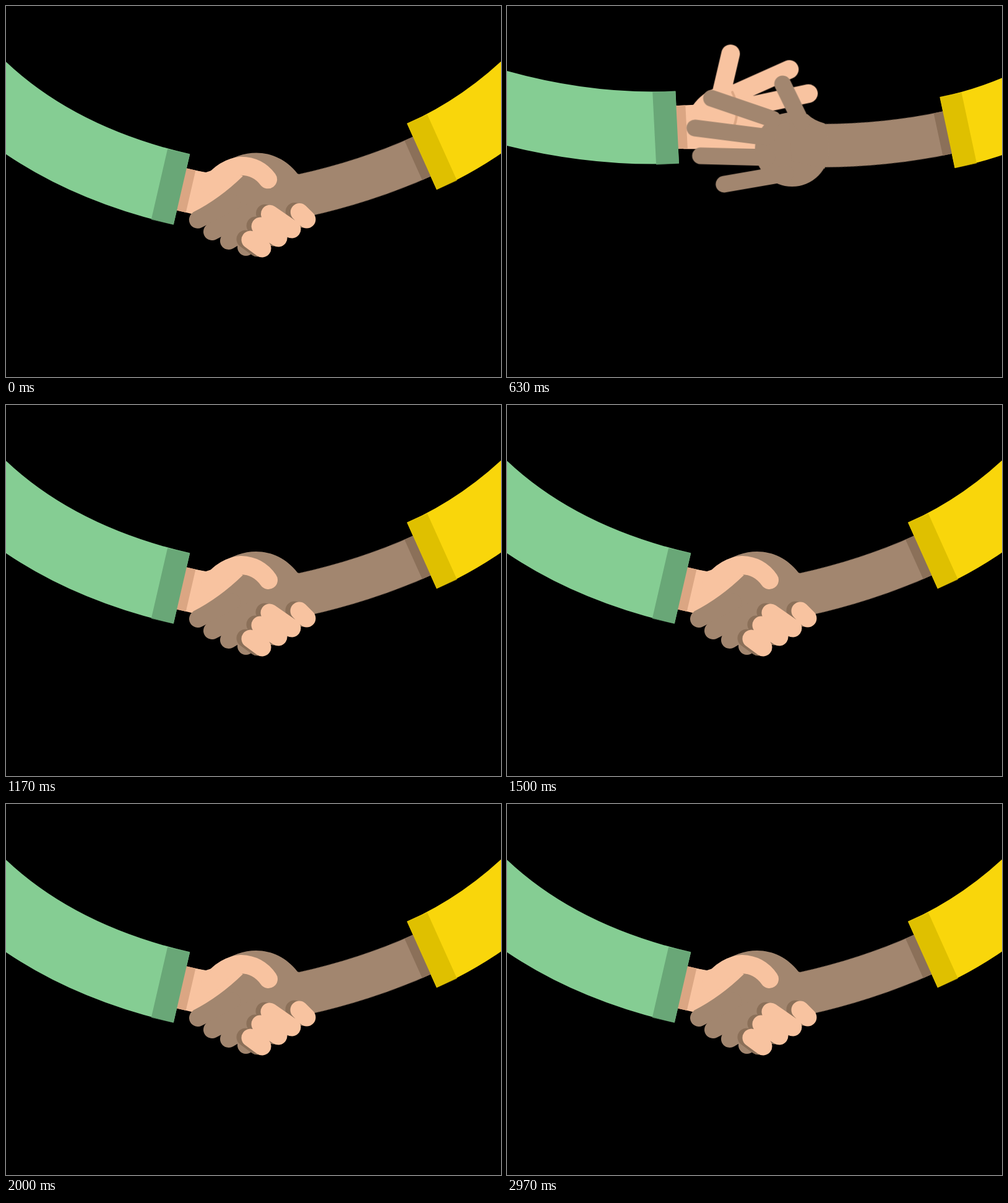
An HTML page without scripts that plays this animation: 800 by 600 pixels, repeating every 3030 ms.

```html
<!DOCTYPE html>
<html lang="en">
<head>
<meta charset="utf-8">
<title>Handshake</title>
<style>
html, body { margin: 0; width: 100%; height: 100%; overflow: hidden; background: #000; }
svg { display: block; width: 100%; height: 100%; }
path { fill: none; }

.peach { --c: #f8c3a0; }
.peach-dark { --c: #dba683; }
.brown { --c: #a2866f; }
.brown-dark { --c: #8b7059; }
.green { --c: #85cd93; }
.green-dark { --c: #69a777; }
.yellow { --c: #f9d60b; }
.yellow-dark { --c: #dfc000; }
.fill { fill: var(--c); }
.line { stroke: var(--c); stroke-linecap: round; stroke-linejoin: round; }
.sleeve { stroke: var(--c); stroke-width: 117; }
.forearm { stroke: var(--c); stroke-width: 70; }

/* One shared clock for every part */
.scene, .left, .right, .left-sleeve, .right-sleeve, .wave, .open, .shut,
.front, .gap, .thumb, .curl, .body, .index, .brown-thumb {
  animation: 3.03s linear infinite;
}
.scene { animation-name: appear; animation-timing-function: step-end; }
.open { animation-name: open; animation-timing-function: step-end; }
.shut { animation-name: shut; animation-timing-function: step-end; }
.front { animation-name: front; animation-timing-function: step-end; }
.gap { animation-name: gap; animation-timing-function: step-end; }
.left { animation-name: left; }
.right { animation-name: right; }
.left-sleeve { animation-name: left-sleeve; }
.right-sleeve { animation-name: right-sleeve; }
.wave { animation-name: wave; transform-origin: 512px 225px; }
.thumb { animation-name: thumb; }
.curl { animation-name: curl; }
.body { animation-name: body; }
.index { animation-name: index; }
.brown-thumb { animation-name: brown-thumb; }

/* Blank stage between the first picture and the entrance */
@keyframes appear { 0%, 5.6%, 100% { opacity: 1 } .95% { opacity: 0 } }
/* Spread hands give way to the grip */
@keyframes open { 0%, 23.8%, 100% { opacity: 0 } .95% { opacity: 1 } }
@keyframes shut { 0%, 23.8%, 100% { opacity: 1 } .95% { opacity: 0 } }
@keyframes front { 0%, 25.5%, 100% { opacity: 1 } .95% { opacity: 0 } }
@keyframes gap { 0%, 30.8%, 100% { opacity: 0 } 23.8% { opacity: 1 } }

/* Arms: far, wide, touching, deepest grip, rest */
@keyframes left {
  0%, .94%, 38%, 100% { transform: translate(284px, 296.5px) rotate(13deg) }
  .95%, 5.6% { transform: translate(-30px, -214px) rotate(-33deg) }
  12.21% { transform: translate(103px, -36px) rotate(-20deg) }
  20.79% { transform: translate(275px, 195px) rotate(-3deg); animation-timing-function: cubic-bezier(.2, .4, .5, 1) }
  28.71% { transform: translate(288.5px, 321.5px) rotate(11.5deg); animation-timing-function: ease-in-out }
}
@keyframes left-sleeve {
  0%, .94%, 38%, 100% { d: path("M-60 113Q67 246 284 296.5") }
  .95%, 5.6% { d: path("M-190 -150Q-100 -180 -30 -214") }
  12.21% { d: path("M-60 10Q30 -9 103 -36") }
  20.79% { d: path("M-60 148Q112 203 275 195"); animation-timing-function: cubic-bezier(.2, .4, .5, 1) }
  28.71% { d: path("M-60 142Q69 277 288.5 321.5"); animation-timing-function: ease-in-out }
}
@keyframes right {
  0%, .94%, 38%, 100% { transform: translate(672px, 243.5px) rotate(-24.2deg) }
  .95%, 5.6% { transform: translate(1060px, -60px) rotate(4deg) }
  12.21% { transform: translate(909px, 62px) rotate(-4.3deg) }
  20.79% { transform: translate(712px, 204px) rotate(-12deg); animation-timing-function: cubic-bezier(.2, .4, .5, 1) }
  28.71% { transform: translate(670px, 273.5px) rotate(-23deg); animation-timing-function: ease-in-out }
}
@keyframes right-sleeve {
  0%, .94%, 38%, 100% { d: path("M672 243.5Q776 197 860 113") }
  .95%, 5.6% { d: path("M1060 -60Q1130 -60 1200 -80") }
  12.21% { d: path("M909 62Q985 58 1055 20") }
  20.79% { d: path("M712 204Q790 188 860 153"); animation-timing-function: cubic-bezier(.2, .4, .5, 1) }
  28.71% { d: path("M670 273.5Q774 227 860 143"); animation-timing-function: ease-in-out }
}
@keyframes wave {
  0%, 5.6% { transform: rotate(20deg) }
  12.21% { transform: rotate(13.3deg) }
  20.79%, 100% { transform: none }
}

/* Fingers closing */
@keyframes thumb {
  0%, 35%, 100% { d: path("M330 290Q352 261 380 259Q408 260 424 283") }
  .95%, 23% { d: path("M330 290Q360 268 372 250Q388 230 399 206") }
  28.71% { d: path("M330 290Q352 261 378 256Q402 250 419 264") }
}
@keyframes curl {
  0%, 35%, 100% { d: path("M395 378L414 392M411 356L440 375M426 336L462 361M474 333L486 345") }
  .95%, 28.71% { d: path("M395 378L414 392M415 359L442 375M440 345L463 361M483 345L486 347") }
}
@keyframes body {
  0%, 35%, 100% { d: path("M471 271C440 231 388 226 345 258L383 275Q345 312 302 334L335 365L395 392L500 337L510 290Z") }
  .95%, 28.71% { d: path("M471 271C440 253 410 245 388 262L383 275Q345 312 302 328L335 365L395 392L500 337L510 290Z") }
}
@keyframes index {
  0%, 35%, 100% { d: path("M310 346L365 318") }
  .95%, 28.71% { d: path("M306 340L362 312") }
}
@keyframes brown-thumb {
  0%, 35%, 100% { d: path("M395 262L440 275") }
  .95%, 28.71% { d: path("M380 233L450 276") }
}
</style>
</head>
<body>
<svg viewBox="0 0 800 600" preserveAspectRatio="none">
  <rect width="800" height="600"/>
  <g class="scene">
    <!-- Left arm, behind -->
    <path class="left-sleeve sleeve green"/>
    <g class="left">
      <rect class="fill peach" y="-35" width="44" height="70"/>
      <g class="open peach" transform="rotate(3) translate(-275 -195)">
        <path class="fill" d="M300 160Q314 139 340 130L375 136L425 162V230H285Z"/>
        <path class="line" stroke-width="30" d="M345 145L361 76M365 142L456 101M395 160L487 140M400 190L440 192M400 212L455 215"/>
        <path class="line peach-dark" stroke-width="4" d="M364 138Q377 165 367 193"/>
      </g>
      <g class="shut peach" transform="rotate(-13) translate(-284 -296.5)">
        <path class="fill" d="M300 265L323 269L345 262L385 275L395 290L330 345L299 335Z"/>
      </g>
      <rect class="fill peach-dark" y="-35" width="15" height="70"/>
      <rect class="fill green-dark" x="-37" y="-58.5" width="37" height="117"/>
    </g>

    <!-- Right arm -->
    <path class="right-sleeve sleeve yellow"/>
    <g class="right">
      <path class="forearm brown" d="M0 0Q-100 0 -204 -22"/>
      <g class="open brown" transform="rotate(12) translate(-712 -204)">
        <g class="wave">
          <circle class="fill" cx="461" cy="231" r="60"/>
          <path class="fill" d="M455 172L486 174Q496 184 514 189V262L460 250Z"/>
          <path class="line" stroke-width="27" d="M446 125L476 187M331 148L430 182M304 196L420 211M313 241L420 244M351 287L450 270"/>
        </g>
      </g>
      <g class="shut brown" transform="rotate(24.2) translate(-672 -243.5)">
        <path class="brown-thumb line" stroke-width="26"/>
        <path class="body fill"/>
        <path class="index line" stroke-width="28"/>
        <path class="line" stroke-width="28" d="M333 365L400 330M360 380L410 350M388 390L410 370"/>
        <path class="gap fill peach" d="M325 347L369 322L329 352ZM350 363L378 351L353 367Z"/>
      </g>
      <rect class="fill brown-dark" x="-15" y="-35" width="15" height="70"/>
      <rect class="fill yellow-dark" y="-58.5" width="36" height="117"/>
    </g>

    <!-- Left thumb and fingertips, in front -->
    <g class="left">
      <g class="shut" transform="rotate(-13) translate(-284 -296.5)">
        <path class="thumb line peach" stroke-width="30"/>
        <g class="front" stroke-width="29">
          <path class="curl line brown-dark" transform="translate(-8 -1)"/>
          <path class="curl line peach"/>
        </g>
      </g>
    </g>
  </g>
</svg>
</body>
</html>
```
